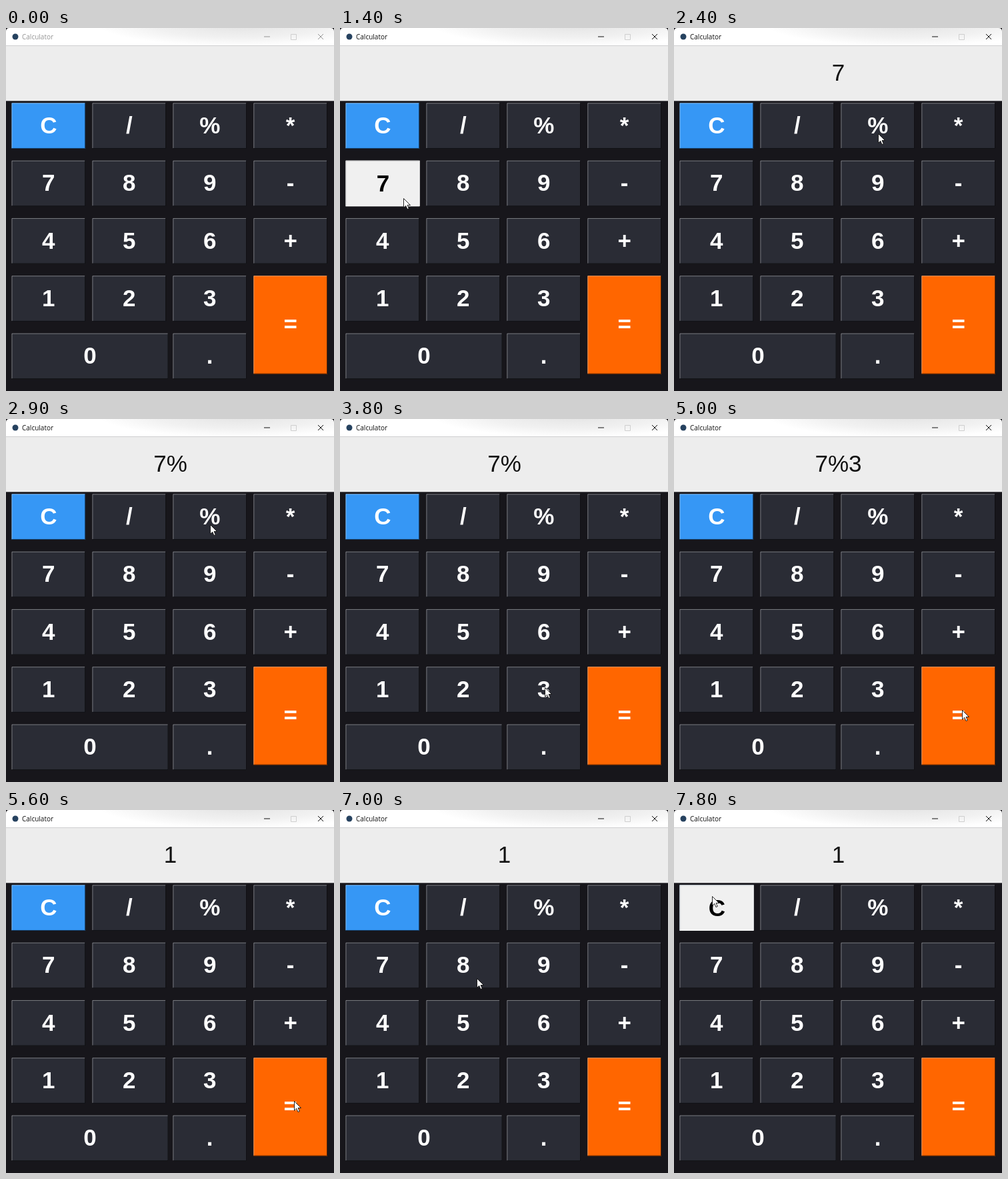
Recreate the animation shown at these times as an HTML page. Size 492 by 544 pixels, loop 8 s.

```html
<!DOCTYPE html>
<html lang="en">
<head>
<meta charset="utf-8">
<title>Calculator</title>
<style>
html, body { margin: 0; width: 100%; height: 100%; overflow: hidden; background: #17161b; }
svg { display: block; width: 492px; height: 544px; }
text { font-family: "Liberation Sans", Arial, sans-serif; font-size: 35px; text-anchor: middle; }
.key text { font-weight: bold; fill: #fff; }
.key .down text { fill: #000; }
.edge { fill: none; stroke-width: .9; }
#bar text { font: 10px "Open Sans", "Noto Sans", sans-serif; text-anchor: start; fill: currentColor; }
#bar path { fill: none; stroke: currentColor; }

#bar, #cursor, .down, .value { animation: 8s step-end infinite; }
.down, .value { opacity: 0; }
#bar { animation-name: focus; }
#cursor { animation-name: move; }

@keyframes focus { 0% { color: #959595; } 17.5% { color: #101010; } }

/* key presses */
@keyframes press-7 { 0%, 20% { opacity: 0; } 17.5% { opacity: 1; } }
@keyframes press-mod { 0%, 36.25% { opacity: 0; } 33.75% { opacity: 1; } }
@keyframes press-3 { 0%, 53.75% { opacity: 0; } 51.25% { opacity: 1; } }
@keyframes press-eq { 0%, 70% { opacity: 0; } 67.5% { opacity: 1; } }
@keyframes press-c { 0% { opacity: 0; } 97.5% { opacity: 1; } }

/* display contents */
@keyframes show-a { 0%, 36.25% { opacity: 0; } 20% { opacity: 1; } }
@keyframes show-b { 0%, 53.75% { opacity: 0; } 36.25% { opacity: 1; } }
@keyframes show-c { 0%, 70% { opacity: 0; } 53.75% { opacity: 1; } }
@keyframes show-d { 0% { opacity: 0; } 70% { opacity: 1; } }

@keyframes move {
  0% { transform: translate(500px, 550px); }
  1.25% { transform: translate(330px, 440px); }
  2.5% { transform: translate(295px, 412px); }
  3.75% { transform: translate(250px, 376px); }
  5% { transform: translate(203px, 336px); }
  6.25% { transform: translate(160px, 300px); }
  7.5% { transform: translate(126px, 273px); }
  8.75% { transform: translate(107px, 257px); }
  10% { transform: translate(98px, 251px); }
  11.25% { transform: translate(95px, 249px); }
  12.5% { transform: translate(95px, 255px); }
  23.75% { transform: translate(86px, 270px); }
  25% { transform: translate(71px, 288px); }
  26.25% { transform: translate(130px, 284px); }
  27.5% { transform: translate(214px, 232px); }
  28.75% { transform: translate(280px, 178px); }
  30% { transform: translate(306px, 158px); }
  42.5% { transform: translate(303px, 186px); }
  43.75% { transform: translate(298px, 252px); }
  45% { transform: translate(301px, 330px); }
  46.25% { transform: translate(306px, 386px); }
  47.5% { transform: translate(307px, 402px); }
  58.75% { transform: translate(326px, 406px); }
  60% { transform: translate(372px, 418px); }
  61.25% { transform: translate(416px, 431px); }
  62.5% { transform: translate(432px, 436px); }
  86.25% { transform: translate(392px, 402px); }
  87.5% { transform: translate(205px, 252px); }
  88.75% { transform: translate(70px, 142px); }
  90% { transform: translate(57px, 129px); }
}
</style>
</head>
<body>
<svg viewBox="0 0 492 544">
  <defs>
    <radialGradient id="haze" gradientUnits="userSpaceOnUse" cx="0" cy="0" r="1"
                    gradientTransform="translate(350 -4) scale(210 31)">
      <stop offset="0" stop-color="#e4e4e4"/>
      <stop offset=".6" stop-color="#f1f1f1"/>
      <stop offset="1" stop-color="#fff"/>
    </radialGradient>
  </defs>
  <rect width="492" height="544" fill="#17161b"/>
  <path d="M0 26.500V5Q0 0 5 0H487Q492 0 492 5V26.500Z" fill="url(#haze)"/>
  <rect y="26.300" width="492" height="83" fill="#ededed"/>

  <g id="bar">
    <circle cx="14" cy="13" r="4.500" fill="#26425f"/>
    <text x="24" y="16.500">Calculator</text>
    <path d="M387 13H396M468 9L476 17M476 9L468 17"/>
    <path d="M427.500 9.500H435.500V17.500H427.500Z" style="stroke:#cfcfcf"/>
  </g>

  <g id="display" fill="#111">
    <text class="value" x="246.500" y="79" style="animation-name:show-a">7</text>
    <text class="value" x="246.500" y="79" style="animation-name:show-b">7%</text>
    <text class="value" x="246.500" y="79" style="animation-name:show-c">7%3</text>
    <text class="value" x="246.500" y="79" style="animation-name:show-d">1</text>
  </g>

  <g id="keys"></g>

  <path id="cursor" d="M.5 .5V14.300L3.700 11.300 6 16.500 8.300 15.500 6.100 10.500H10.500Z"
        fill="#fff" stroke="#111" stroke-width=".9"/>
</svg>
<script>
const rows = ["C/%*", "789-", "456+", "123=", "0 ."];
const press = { C: "press-c", 7: "press-7", "%": "press-mod", 3: "press-3", "=": "press-eq" };
const fills = { C: "#3697f5", "=": "#ff6600" };

// Two-tone bevel: one tone at the top left, the other at the bottom right
function face(x, y, w, h, fill, light, shade) {
  const r = x + w - .45, b = y + h - .45;
  return `<rect x="${x}" y="${y}" width="${w}" height="${h}" fill="${fill}"/>
    <path class="edge" stroke="${shade}" d="M${x} ${b}H${r}V${y}"/>
    <path class="edge" stroke="${light}" d="M${x + .45} ${b - .45}V${y + .45}H${r - .45}"/>`;
}

function key(label, col, row) {
  const x = 8.5 + col * 120.95, y = 112.4 + row * 86.3;
  const w = label === "0" ? 235 : 110.6, h = label === "=" ? 147.3 : 68.5;
  const cx = x + w / 2, base = y + h / 2 + 11.5;
  const name = press[label];
  const up = face(x, y, w, h, fills[label] || "#2a2c35", "rgba(255,255,255,.42)", "rgba(0,0,0,.7)") +
    `<text x="${cx}" y="${base}">${label}</text>`;
  const down = name ? `<g class="down" style="animation-name:${name}">` +
    face(x, y, w + .5, h, "#f0f0f0", "#c4c4c4", "#fafafa") +
    `<text x="${cx + .6}" y="${base + .6}">${label}</text></g>` : "";
  return `<g class="key">${up}${down}</g>`;
}

document.getElementById("keys").innerHTML = rows.map((line, row) =>
  [...line].map((label, col) => label === " " ? "" : key(label, col, row)).join("")
).join("");
</script>
</body>
</html>
```
